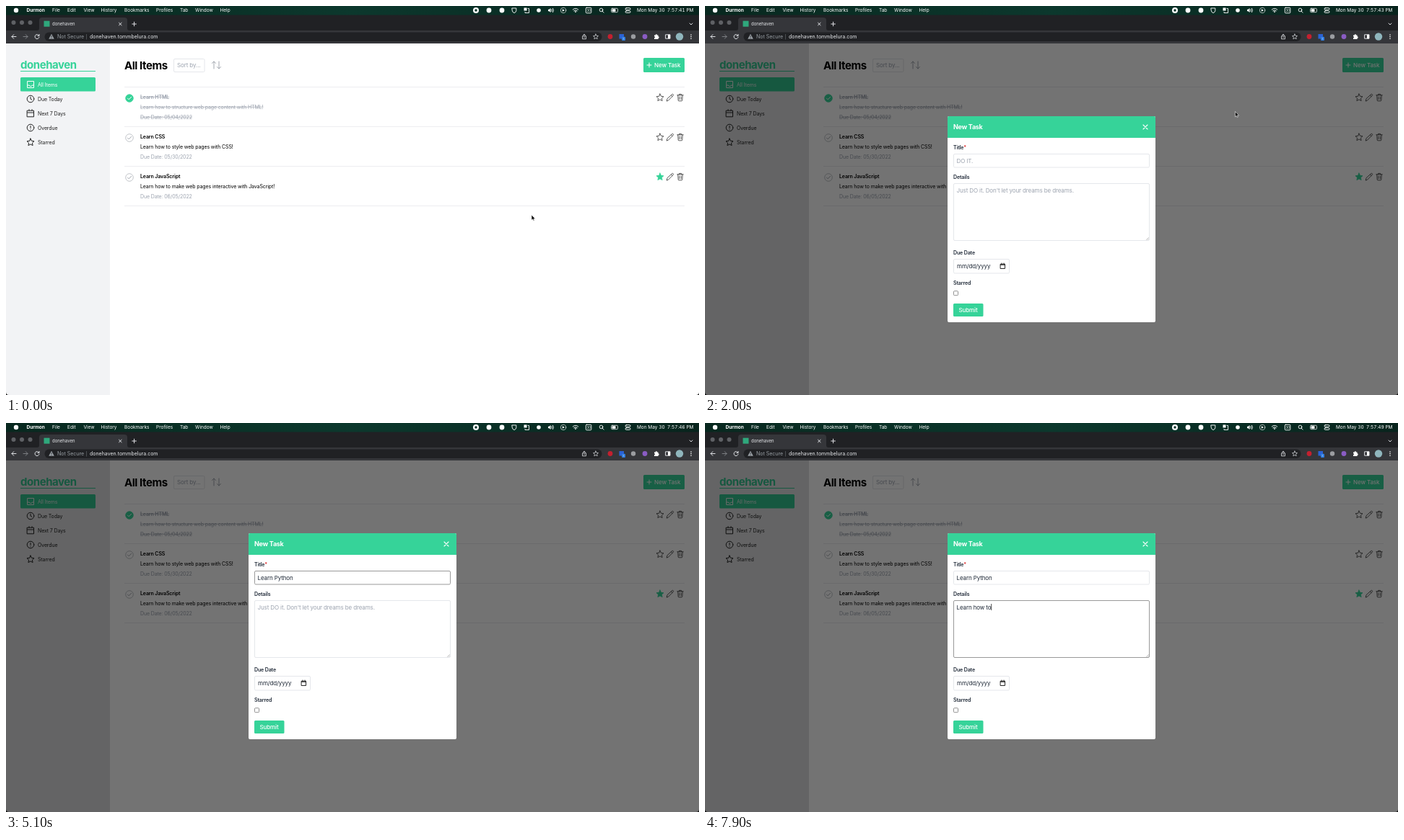
Write an HTML page that moves like this. It is 960 by 540 pixels and loops after 8 s.

```html
<!DOCTYPE html>
<html lang="en">
<head>
<meta charset="utf-8">
<title>Task list</title>
<style>
html, body { margin: 0; width: 100%; height: 100%; overflow: hidden; background: #fff; }
svg { display: block; width: 100vw; height: 100vh; }
text { font: 7px Inter, sans-serif; letter-spacing: -.017em; white-space: pre; }
.menu text { font-size: 6.5px; letter-spacing: 0; fill: #fff; }
.bar text { letter-spacing: 0; fill: #e8eaed; }
text.md { font-size: 8px; letter-spacing: -.015em; }
text.big { font-size: 15px; font-weight: 700; letter-spacing: -.03em; }
text.bold, .bold text { font-weight: 600; }
text.head { font-size: 9px; font-weight: 700; letter-spacing: -.03em; }
text.mid { font-weight: 500; }
.line { fill: none; stroke: currentColor; stroke-linecap: round; stroke-linejoin: round; }
.green { fill: #36d399; }
.grey { fill: #9ca3af; }
.white { fill: #fff; }
.done text { fill: #9ca3af; text-decoration: line-through; }
.field { fill: #fff; stroke: #e5e7eb; }
.rule { stroke: #ededf0; }
</style>
</head>
<body>
<svg viewBox="0 0 960 540">
<defs>
  <linearGradient id="sky">
    <stop stop-color="#08281f"/><stop offset=".5" stop-color="#0c382d"/><stop offset="1" stop-color="#08241d"/>
  </linearGradient>
  <path id="star" d="M0-5L1.5-1.7 5-1.3 2.4 1.1 3.1 4.6 0 2.9-3.1 4.6-2.4 1.1-5-1.3-1.5-1.7Z"/>
  <path id="pencil" d="M-4.7 4.7l.7-3L2.6-4.3q.8-.7 1.6 0 .8.8 0 1.6L-2.2 3.9ZM1.4-3.2L3.1-1.5"/>
  <path id="trash" d="M-4.2-3.2H4.2M-3.3-3.2l.5 7.2q.1.8.9.8H1.9q.8 0 .9-.8L3.3-3.2M-1.5-3.2v-1.4h3v1.4M-1.2-1V2.6M1.2-1V2.6"/>
  <path id="tick" d="M-2.5.1L-.8 1.8 2.6-1.7"/>
  <g id="clock"><circle r="4.8"/><path d="M0-2.8V0l1.8 1.2"/></g>
</defs>

<!-- System menu bar -->
<g class="menu">
  <rect width="960" height="13" fill="url(#sky)"/>
  <circle class="white" cx="14" cy="6" r="3.2"/>
  <g id="menus"></g>
  <g class="white">
    <circle cx="651" cy="6" r="4"/><circle cx="651" cy="6" r="1.7" fill="#0a2f26"/>
    <circle cx="669" cy="6" r="3.4"/><circle cx="687" cy="6" r="3.4"/>
    <circle cx="738" cy="6" r="2.8"/>
    <path d="M751 4.7h1.5l2-1.8v6.2l-2-1.8H751ZM770.8 4.2l3.2 1.8-3.2 1.8ZM789 9.3l-1.4-1.6q1.4-1 2.8 0Z"/>
    <rect x="717.5" y="2.5" width="4" height="4"/>
    <rect x="839.5" y="4.3" width="5" height="3.4" rx=".6"/>
  </g>
  <g class="line" color="#fff" stroke-width=".9">
    <path d="M701.2 3h5.6v3.5q0 2-2.8 3.2-2.8-1.2-2.8-3.2ZM719 8.5v1h5.5v-6h-1.5M756 4.5q1 1.5 0 3M757.6 3.3q1.9 2.7 0 5.4"/>
    <circle cx="772" cy="6" r="3.7" opacity=".7"/>
    <path d="M785.2 5q3.8-3.3 7.6 0M786.7 6.7q2.3-1.9 4.6 0M826 7l2 2.2"/>
    <circle cx="824.5" cy="5.5" r="2.3"/>
    <rect x="803.3" y="2.3" width="7.5" height="7.5" rx="1"/>
    <rect x="838.5" y="3.3" width="9" height="5.4" rx="1.3" opacity=".8"/>
    <rect x="858" y="2.7" width="7" height="2.6" rx="1.3"/><rect x="858" y="6.8" width="7" height="2.6" rx="1.3"/>
  </g>
  <text x="804.6" y="8" style="font-size:4.5px">30</text>
  <text id="time" x="874" y="8.4" style="font-variant-numeric:tabular-nums"></text>
</g>

<!-- Browser tabs and toolbar -->
<g class="bar">
  <rect y="12.5" width="960" height="22" fill="#202124"/>
  <rect y="34" width="960" height="18" fill="#35363a"/>
  <path d="M43 34q3 0 3-3V20q0-4 4-4H164q4 0 4 4V31q0 3 3 3Z" fill="#35363a"/>
  <g fill="#5f6165"><circle cx="10.5" cy="23" r="3"/><circle cx="22" cy="23" r="3"/><circle cx="33.5" cy="23" r="3"/></g>
  <rect x="52.5" y="20.7" width="8" height="8" fill="#2fa87c"/>
  <text x="64" y="27.2" style="font-size:6px">donehaven</text>
  <rect x="53.5" y="36.5" width="772" height="12.5" rx="6.2" fill="#202124"/>
  <path d="M63 38.8L66.8 45.8H59.2Z" fill="#9aa0a6"/>
  <path d="M63 41v2.3M63 44.2v.8" stroke="#202124" stroke-width=".8"/>
  <text x="71" y="45" style="fill:#9aa0a6">Not Secure</text>
  <path d="M111.5 39v7.5" stroke="#5f6368" stroke-width=".7"/>
  <text x="116" y="45">donehaven.tommbelura.com</text>
  <g class="line" color="#dfe1e5">
    <path d="M156.5 23.2l3.6 3.6m0-3.6l-3.6 3.6M174.8 25h5.6M177.6 22.2v5.6M947 24l2 2 2-2"/>
    <path d="M14 42.5H8m2.7-2.8L8 42.5l2.7 2.8"/>
    <path d="M24 42.5h6m-2.7-2.8l2.7 2.8-2.7 2.8" stroke="#7d8084"/>
    <path d="M45.6 41A3 3 0 1 0 46 43.2M46 39.4v2h-2"/>
    <path d="M799.8 41.8h-1.3v4h5v-4h-1.3M801 44v-4.7M799.5 40.6l1.5-1.5 1.5 1.5" stroke-width=".8"/>
    <use href="#star" transform="translate(817 42.5) scale(.7)"/>
    <rect x="914" y="39.8" width="6" height="5.4"/>
  </g>
  <rect x="917" y="39.8" width="3" height="5.4" class="white"/>
  <circle cx="837" cy="42.5" r="3.4" fill="#c4202f"/>
  <rect x="849.5" y="39" width="6.5" height="6.5" fill="#2a62d6"/>
  <rect x="853" y="42.8" width="5" height="5.2" rx="1" fill="#2f7de1"/>
  <text x="854.6" y="47" style="font-size:4px">1</text>
  <circle cx="869" cy="42.5" r="3.2" fill="#9b9da1"/>
  <circle cx="885" cy="42.5" r="3.4" fill="#8a5cc4"/>
  <path class="white" d="M898 40.5h1.6a1.3 1.3 0 1 1 2.6 0H903.5v1.8a1.2 1.2 0 1 1 0 2.4V46H898v-1.8a1 1 0 1 0 0-2Z"/>
  <circle cx="933" cy="42.5" r="5.2" fill="#8fb6bd"/>
  <g class="white"><circle cx="949" cy="40" r=".8"/><circle cx="949" cy="42.6" r=".8"/><circle cx="949" cy="45.2" r=".8"/></g>
</g>

<!-- Page -->
<rect y="52" width="960" height="488" fill="#fff"/>
<rect y="52" width="144" height="488" fill="#f2f3f5"/>
<text class="big green" x="20" y="86.5">donehaven</text>
<rect class="green" x="20" y="90" width="104" height="1"/>
<rect class="green" x="20" y="99" width="104" height="19.5" rx="1.5"/>
<g id="nav"></g>
<g class="line" color="#222">
  <path d="M30 104.5h8.5v9H30ZM30 110h2.3q.4 1.5 2 1.5t2-1.5h2.2" stroke="#fff"/>
  <use href="#clock" x="34" y="129"/>
  <path d="M29.5 145.2h9v8.6h-9ZM29.5 148h9M32 145v-1.3M36 145v-1.3"/>
  <circle cx="34" cy="169" r="4.8"/><path d="M34 166.5v2.8M34 171.2v.2"/>
  <use href="#star" x="34" y="189"/>
</g>
<text class="big" x="164" y="87.7">All Items</text>
<rect class="field" x="232.5" y="73.5" width="42.5" height="18" rx="1.5"/>
<text class="md grey" x="237" y="85">Sort by...</text>
<path class="line" color="#a3a8b0" d="M288 87v-10m-2.5 2.5L288 77l2.5 2.5M295 77v10m-2.5-2.5L295 87l2.5-2.5"/>
<rect id="add" x="883" y="72" width="57" height="20" rx="1.5"/>
<path class="line" color="#fff" d="M888 82h6M891 79v6"/>
<text class="md mid white" x="898" y="85">New Task</text>
<path class="rule" d="M164 112.5H940"/>
<g id="rows"></g>
<path d="M0 536v4h4q-4 0-4-4M960 536v4h-4q4 0 4-4" fill="#111"/>

<!-- Dialog -->
<g id="dialog">
  <rect y="52" width="960" height="488" opacity=".55"/>
  <rect y="52" width="144" height="488" opacity=".08"/>
  <rect class="white" x="336" y="153" width="288" height="286" rx="2"/>
  <path class="green" d="M336 183v-28q0-2 2-2H622q2 0 2 2v28Z"/>
  <text class="head white" x="344" y="171.2">New Task</text>
  <path class="line" color="#fff" stroke-width="1.1" d="M607 165l6 6m0-6l-6 6"/>
  <g class="bold" fill="#1f2937">
    <text x="344" y="198.5">Title<tspan fill="#dc2626">*</tspan></text>
    <text x="344" y="239.5">Details</text>
    <text x="344" y="344.5">Due Date</text>
    <text x="344" y="386.5">Starred</text>
  </g>
  <rect class="field" id="titleBox" x="344.5" y="205.5" width="271" height="18.5" rx="1.5"/>
  <rect class="field" id="detailsBox" x="344.5" y="246.5" width="271" height="79" rx="1.5"/>
  <path class="line" color="#888" stroke-width=".5" d="M611.5 324.5l3-3M613.3 324.5l1.2-1.2"/>
  <text class="md" id="title" x="348.5" y="217.5"></text>
  <text class="md" id="details" x="348.5" y="258.5"></text>
  <rect id="caret" width=".7" height="9"/>
  <rect class="field" x="344.5" y="351.5" width="77" height="19.5" rx="1.5"/>
  <text class="md" x="349" y="364" fill="#1f2937">mm/dd/yyyy</text>
  <path class="line" color="#111" stroke-width=".9" d="M409.5 358.3h6v6.2h-6ZM409.5 359.3h6M411 358v-1M414 358v-1"/>
  <rect x="344.5" y="395.7" width="6" height="6" rx="1" fill="#fff" stroke="#767676" stroke-width=".8"/>
  <rect class="green" x="344" y="413" width="41.5" height="18" rx="1.5"/>
  <text class="md mid white" x="351.5" y="425">Submit</text>
</g>

<!-- Pointer -->
<g id="pointer">
  <circle id="ring" r="14.5" fill="none" stroke="#000" stroke-width="1.5"/>
  <path id="arrow" d="M0 0V7.3L1.7 5.8 2.8 8.2 3.9 7.7 2.9 5.4H5.1Z" stroke="#fff" stroke-width=".6"/>
  <path id="hand" d="M.2 1q.8-.6 1.2.3V3.5l2.4.5q.9.3.7 1.4L4 8.3H.9L-1.4 5.4q-.2-.9.7-.8L.2 5.3Z" fill="#fff" stroke="#000" stroke-width=".7"/>
  <path id="beam" class="line" color="#000" stroke-width=".8" d="M-1.5-4Q0-4 0-3 0-4 1.5-4M0-3V3M-1.5 4Q0 4 0 3 0 4 1.5 4M-.8 1H.8"/>
</g>
</svg>

<script>
const $ = id => document.getElementById(id);
const show = (id, on) => $(id).style.display = on ? '' : 'none';
const ease = (t, a, b) => {
  const k = Math.min(1, Math.max(0, (t - a) / (b - a)));
  return k * k * (3 - 2 * k);
};

const menus = [['Durmon', 28.5], ['File', 64], ['Edit', 85], ['View', 107.5], ['History', 131.5],
  ['Bookmarks', 164], ['Profiles', 208], ['Tab', 241], ['Window', 262], ['Help', 296.5]];
$('menus').innerHTML = menus.map(([name, x], i) =>
  `<text x="${x}" y="8.4" style="font-weight:${i ? 400 : 700}">${name}</text>`).join('');

$('nav').innerHTML = ['All Items', 'Due Today', 'Next 7 Days', 'Overdue', 'Starred'].map((name, i) =>
  `<text x="44" y="${111.5 + 20 * i}" fill="${i ? '#222' : '#fff'}">${name}</text>`).join('');

const tasks = [
  { name: 'HTML', text: 'structure web page content with HTML!', due: '05/04', done: true },
  { name: 'CSS', text: 'style web pages with CSS!', due: '05/30' },
  { name: 'JavaScript', text: 'make web pages interactive with JavaScript!', due: '06/05', star: true }
];
$('rows').innerHTML = tasks.map(({ name, text, due, done, star }, i) => `
  <g transform="translate(0 ${55 * i})">
    <g class="${done ? 'done' : ''}">
      <text class="bold" x="186" y="128.5">Learn ${name}</text>
      <text x="186" y="142.5">Learn how to ${text}</text>
      <text class="grey" x="186" y="156.5">Due Date: ${due}/2022</text>
    </g>
    <circle cx="171" cy="128" r="5.3" fill="${done ? '#36d399' : 'none'}" stroke="${done ? '#36d399' : '#b4b8be'}" stroke-width=".8"/>
    <use href="#tick" x="171" y="128" class="line" color="${done ? '#fff' : '#a3a8b0'}"/>
    <g class="line" color="#333" stroke-width=".8">
      <use href="#star" x="906" y="127" ${star ? 'style="fill:#36d399;stroke:#36d399"' : ''}/>
      <use href="#pencil" x="920" y="127"/>
      <use href="#trash" x="934" y="127"/>
    </g>
    <path class="rule" d="M164 167.5H940"/>
  </g>`).join('');

// Keystrokes: [time, field content]
const typed = {
  title: [[2400, ''], [3200, 'L'], [3400, 'Le'], [3500, 'Lea'], [3600, 'Lear'], [3700, 'Learn '], [3900, 'Learn P'],
    [4200, 'Learn Py'], [4400, 'Learn Pyt'], [4500, 'Learn Pytho'], [4600, 'Learn Python']],
  details: [[5200, ''], [5500, 'L'], [5700, 'Lea'], [5800, 'Lear'], [5900, 'Learn'], [6000, 'Learn '],
    [6400, 'Learn h'], [6500, 'Learn hw'], [6600, 'Learn hwo'], [6700, 'Learn hwo '],
    [7000, 'Learn hwo'], [7100, 'Learn hw'], [7200, 'Learn h'], [7300, 'Learn '],
    [7500, 'Learn h'], [7600, 'Learn ho'], [7700, 'Learn how'], [7800, 'Learn how t'], [7900, 'Learn how to']]
};
const hints = { title: 'DO IT.', details: "Just DO it. Don't let your dreams be dreams." };

function drawField(id, t, focused) {
  const [since, value] = typed[id].filter(k => k[0] <= t).pop() || [0, ''];
  const el = $(id);
  el.textContent = value || hints[id];
  el.setAttribute('fill', value ? '#1f2937' : '#9ca3af');
  $(id + 'Box').style.stroke = focused ? '#999' : '';
  if (!focused) return;
  $('caret').setAttribute('x', 348.5 + (value ? el.getComputedTextLength() : 0));
  $('caret').setAttribute('y', id === 'title' ? 210 : 251);
  show('caret', (t - since) % 1000 < 500);
}

function drawPointer(t) {
  const a = ease(t, 0, 920), b = ease(t, 1650, 2400);
  const x = 728 + 166 * a - 353 * b;
  const y = 290 - 200 * a + 125 * b + 6 * ease(t, 2400, 2500);
  const overButton = t < 1200 && y < 92;
  const overField = t > 1700 && x < 616 && y > 205;
  $('pointer').setAttribute('transform', `translate(${x} ${y})`);
  show('pointer', t < 3200);
  show('ring', t >= 1100 && t < 1200 || t >= 2400 && t < 2500);
  show('hand', overButton);
  show('beam', overField);
  show('arrow', !overButton && !overField);
}

function draw(t) {
  $('time').textContent = `Mon May 30  7:57:${41 + Math.floor((t + 800) / 1000)} PM`;
  const hover = ease(t, 850, 1000) - ease(t, 1200, 1400);
  $('add').setAttribute('fill', `rgb(${54 - 38 * hover},${211 - 26 * hover},${153 - 24 * hover})`);
  show('dialog', t >= 1200);
  show('caret', false);
  drawField('title', t, t >= 2400 && t < 5200);
  drawField('details', t, t >= 5200);
  drawPointer(t);
}

function loop() {
  draw(performance.now() % 8000);
  requestAnimationFrame(loop);
}
loop();
</script>
</body>
</html>
```
